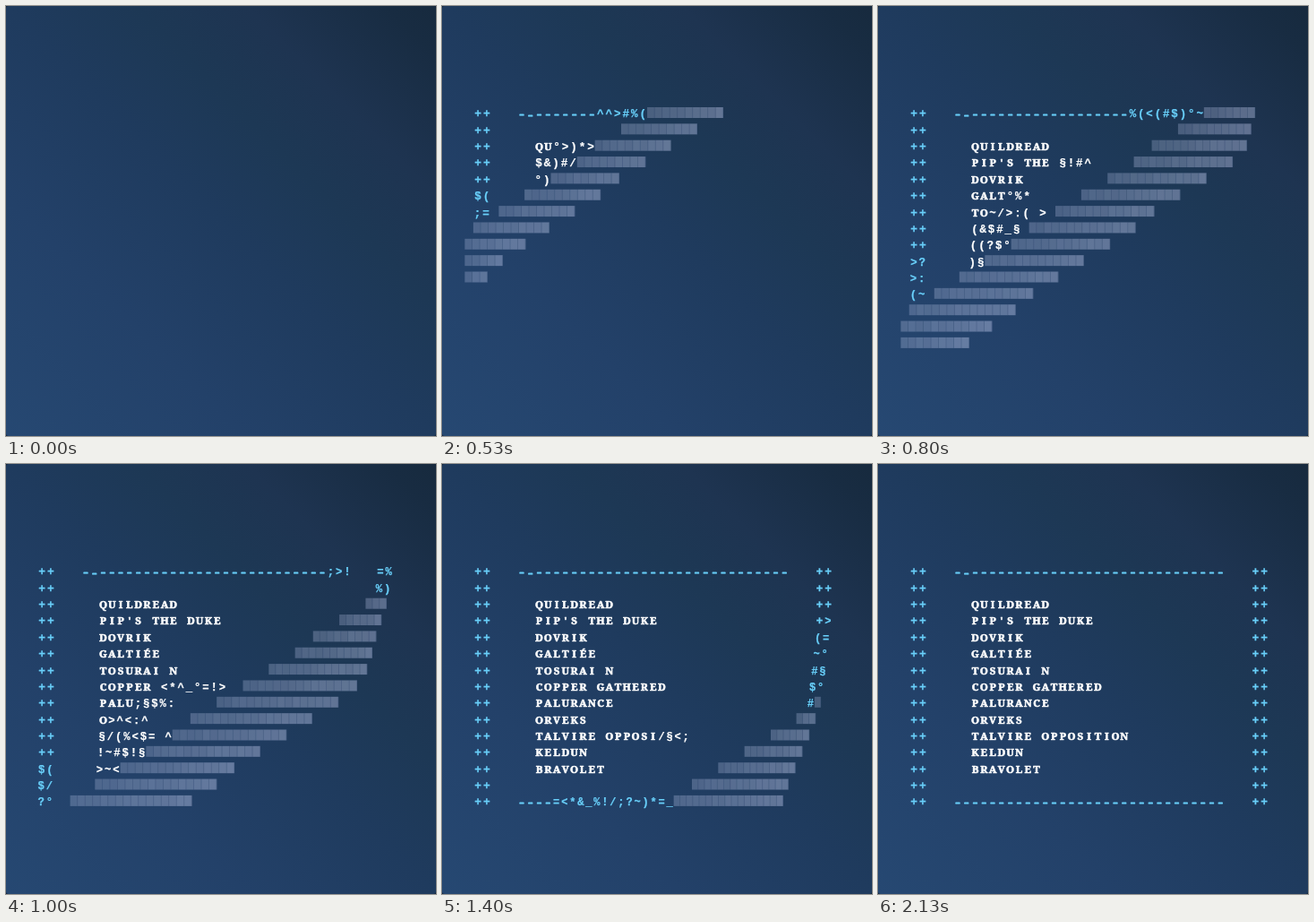
Recreate the animation shown at these times as an HTML page with a canvas. Size 480x480 px, loop 2190 ms.

```html
<!DOCTYPE html>
<html lang="en">
<head>
<meta charset="utf-8">
<title>Text board</title>
<style>
html, body { margin: 0; width: 100%; height: 100%; overflow: hidden; background: #12253b; }
#stage {
  width: 480px; height: 480px; border-radius: 3px;
  background: linear-gradient(45deg, #264872, #234169 28%, #1f3b5e 50%, #1d3855 65%, #1e3451 78%, #182c42 94%, #172a3e);
}
canvas { display: block; width: 480px; height: 480px; }
</style>
</head>
<body>
<div id="stage"><canvas id="board"></canvas></div>
<script>
const LOOP = 2190, COLS = 42, ROWS = 15;
const LEFT = 25.4, CELL = 9.78, BASE = 123.95, LINE = 18.35;
const SLANT = 2.8; // columns the wave lags per row
const CYAN = '#69d0fa', WHITE = '#ffffff';
const NOISE = '/;$§)(%°=><*&#!?^_~:';

const WORDS = [
  'QUILDREAD', "PIP'S THE DUKE", 'DOVRIK', 'GALTIÉE', 'TOSURAI N',
  'COPPER GATHERED', 'PALURANCE', 'ORVEKS', 'TALVIRE OPPOSITION',
  'KELDUN', 'BRAVOLET'
];

// Wave fronts in columns on the first row: [step, column]
const SETTLED = [[2, 0], [8, 15.8], [12, 26.9], [15, 34.7], [21, 50.1], [27, 67.6], [32, 81.8]];
const NOISY = [[2, 0], [8, 21.5], [12, 35.5], [15, 45.1], [21, 64.3], [27, 83.5]];
const BLOCKS = [[1, 0], [8, 31.1], [12, 48.7], [15, 60.5], [27, 107]];

const canvas = document.getElementById('board');
const ctx = canvas.getContext('2d');
const dpr = window.devicePixelRatio || 1;
canvas.width = canvas.height = 480 * dpr;
ctx.scale(dpr, dpr);
ctx.textAlign = 'center';
ctx.lineJoin = 'round';

function makeLine(row) {
  const line = Array(COLS).fill(' ');
  const put = (col, text) => [...text].forEach((c, i) => { line[col + i] = c; });
  put(1, '++');
  put(40, '++');
  if (row === 0 || row === ROWS - 1) put(6, '–'.repeat(31));
  else if (WORDS[row - 2]) put(8, WORDS[row - 2]);
  return line;
}
const lines = Array.from({ length: ROWS }, (_, row) => makeLine(row));

function along(knots, step) {
  if (step <= knots[0][0]) return knots[0][1];
  for (let i = 1; i < knots.length; i++) {
    const [a, from] = knots[i - 1], [b, to] = knots[i];
    if (step <= b) return from + (to - from) * (step - a) / (b - a);
  }
  return knots[knots.length - 1][1];
}

function front(knots, step, row) {
  const col = Math.floor(along(knots, step) - SLANT * row + 1e-6);
  return Math.max(0, Math.min(COLS, col));
}

function random(a, b, c) {
  const v = Math.sin(a * 12.99 + b * 78.23 + c * 37.72) * 43758.55;
  return v - Math.floor(v);
}

// Font and extra outline weight for one character
function styleOf(char, width) {
  if (char === '–') return ['bold 10px "Liberation Mono", monospace', 0.9];
  if (/[A-ZÀ-Ý']/.test(char)) return ['bold 11.5px "Noto Serif", serif', 0.6];
  return [`bold ${13 * width / CELL}px "Liberation Mono", monospace`, 0.25];
}

function drawChar(char, x, y, width, color) {
  if (char === ' ') return;
  const [font, weight] = styleOf(char, width);
  ctx.font = font;
  ctx.lineWidth = weight;
  ctx.fillStyle = ctx.strokeStyle = color;
  ctx.fillText(char, x + width / 2, y);
  ctx.strokeText(char, x + width / 2, y);
}

function drawBlocks(x, row, from, to, step) {
  const width = to === COLS ? 9.5 - 0.11 * step : 8.5;
  const count = to - from, top = 113 + LINE * row;
  for (let i = 0; i < count; i++) {
    const left = x + i * width;
    const alpha = 0.28 + 0.15 * i / count + 0.04 * random(i, row, step);
    ctx.fillStyle = `rgba(185,196,230,${alpha})`;
    ctx.fillRect(left, top, width, 12);
    ctx.fillStyle = 'rgba(35,60,100,.3)';
    ctx.fillRect(left + width - 0.8, top, 0.8, 12);
  }
}

function drawRow(row, step) {
  const settled = front(SETTLED, step, row);
  const noisy = front(NOISY, step, row);
  const end = front(BLOCKS, step, row);
  const noiseCell = CELL - Math.min(0.036 * step, 0.75);
  const y = Math.ceil(BASE + LINE * row);
  let x = LEFT;
  for (let col = 0; col < noisy; col++) {
    const done = col < settled;
    const width = done ? CELL : noiseCell;
    let char = lines[row][col];
    const isWord = row > 1 && row < 13 && col > 7 && col < 40;
    if (!done && char !== ' ') char = NOISE[Math.floor(random(col, row, step) * NOISE.length)];
    const drop = char === '–' && row === 0 && col === 7 ? 1 : 0;
    drawChar(char, x, y + drop, width, isWord ? WHITE : CYAN);
    x += width;
  }
  if (end > noisy) drawBlocks(x, row, noisy, end, step);
}

function draw() {
  const time = performance.now() % LOOP;
  // 15 steps a second, on a 10 ms clock
  const step = Math.floor((Math.floor(time / 10) + 0.5) * 0.15);
  ctx.clearRect(0, 0, 480, 480);
  for (let row = 0; row < ROWS; row++) drawRow(row, step);
  requestAnimationFrame(draw);
}
draw();
</script>
</body>
</html>
```
